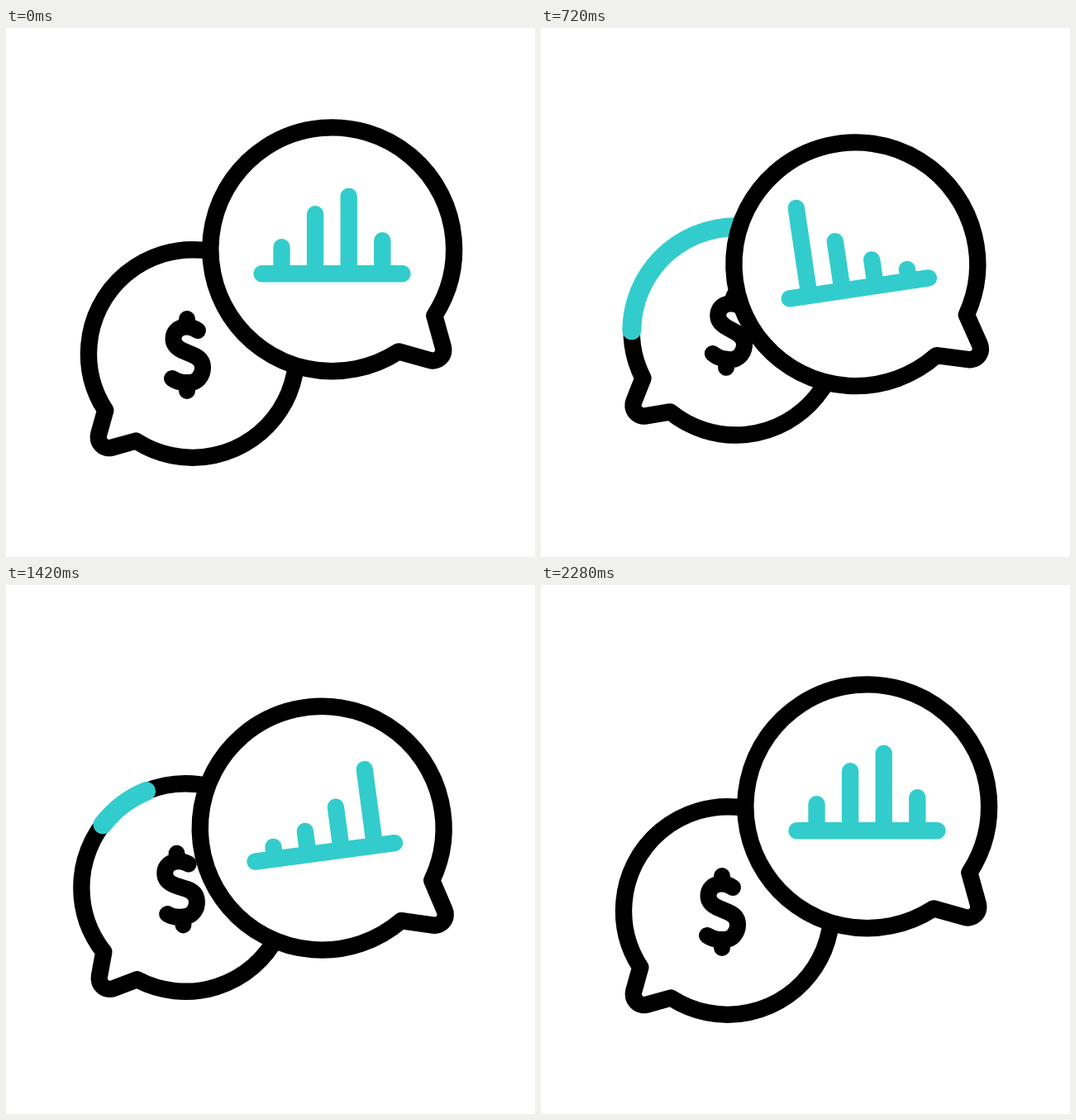
Write an HTML page with a canvas that moves like this. It is 640 px wide and 640 px high and loops after 2400 ms.

```html
<!DOCTYPE html>
<html lang="en">
<head>
<meta charset="utf-8">
<title>Chat bubbles</title>
<style>
  html, body { margin: 0; height: 100%; overflow: hidden; background: #fff; }
  canvas { display: block; width: 640px; height: 640px; }
</style>
</head>
<body>
<canvas id="stage" width="640" height="640"></canvas>
<script>
const ctx = document.getElementById('stage').getContext('2d');
const TEAL = '#33cccc', LOOP = 2400, REST = 2280, RAD = Math.PI / 180;

const sine = u => (1 - Math.cos(Math.PI * u)) / 2;
const quad = u => u < .5 ? 2 * u * u : 1 - 2 * (1 - u) ** 2;

// Eased position k along evenly spaced values, held at both ends
function glide(values, k, ease = sine) {
  const last = values.length - 1;
  k = Math.min(Math.max(k, 0), last);
  const i = Math.min(Math.floor(k), last - 1);
  return values[i] + (values[i + 1] - values[i]) * ease(k - i);
}

// Swings from rest through alternating peaks and back to rest
const swing = (first, step, ...peaks) => t =>
  glide([0, ...peaks, 0], t < first ? t / first : 1 + (t - first) / step);

const big = {
  x: 394.7, y: 267.8, r: 147.4, side: 1, pivotX: -83, pivotY: 101,
  tilt: swing(612, 417, -13, 16, -7.8, 4),
  lift: swing(572, 348, 58.6, -47.3, 53, -13.3)
};
const small = {
  x: 225.8, y: 394, r: 125.8, side: -1, pivotX: 24, pivotY: 94,
  tilt: swing(400, 455, -19, 12.4, -6.7, 4),
  lift: swing(355, 355, 31.5, -27.5, 63.5, -28, 21)
};

const dollar = new Path2D(`M232 366Q226 361.5 219 361.5C207 361.5 202.5 369 202.5 376
  S207 387 213 390L227 396C234 399 238 404 238 411C238 421 231 429 222 429
  H217Q208 429 201 424M219 352V361M219 429V439`);

// Speech bubble outline; starts near the top and may go round several times
function outline({ r, side }, turns) {
  const path = new Path2D(), start = 265 * RAD, a = 33 * RAD, b = 57 * RAD;
  const tip = r * .952;
  for (let i = 0; i < turns; i++) {
    path.arc(0, 0, r, start, a);
    path.arcTo(tip, tip, r * Math.cos(b), r * Math.sin(b), 13);
    path.arc(0, 0, r, b, start);
  }
  if (turns === 1) path.closePath();
  const placed = new Path2D();
  placed.addPath(path, new DOMMatrix([side, 0, 0, 1, 0, 0]));
  return placed;
}
big.path = outline(big, 1);
small.path = outline(small, 1);
const trail = outline(small, 2);

function stroke(path, color, width) {
  ctx.strokeStyle = color;
  ctx.lineWidth = width;
  ctx.stroke(path);
}

function drawBubble({ x, y, pivotX, pivotY, tilt, lift, path }, t, drawContent) {
  const angle = tilt(t) * RAD;
  ctx.save();
  ctx.translate(x + pivotX * (Math.cos(angle) - 1) + pivotY * Math.sin(angle), y + lift(t));
  ctx.rotate(angle);
  ctx.fillStyle = '#fff';
  ctx.fill(path);
  stroke(path, '#000', 20.4);
  drawContent(t);
  ctx.restore();
}

function drawDollar(t) {
  const sweep = start => glide([0, 940], (t - start) / 692);
  const head = sweep(497), tail = sweep(847);
  if (head - tail > .5) {
    ctx.setLineDash([head - tail, 4000]);
    ctx.lineDashOffset = -tail;
    stroke(trail, TEAL, 23);
    ctx.setLineDash([]);
  }
  ctx.translate(-small.x, -small.y);
  stroke(dollar, '#000', 20);
}

// Bars fall into a descending ramp, then an ascending one, then return
function drawChart(t) {
  const base = 297.2, chart = new Path2D(`M309.5 ${base}H479.5`);
  const ramp = (top, k) => top * .61 ** k - 13.5;
  [32, 72, 93.5, 40].forEach((rest, i) => {
    const x = 333.5 + 40.6 * i;
    const levels = [rest, ramp(121, i), ramp(109.5, 3 - i), rest];
    chart.moveTo(x, base);
    chart.lineTo(x, base - glide(levels, 3 * t / REST, quad));
  });
  ctx.translate(-big.x, -big.y);
  stroke(chart, TEAL, 20.4);
}

function frame() {
  const t = Math.floor(performance.now() % LOOP / 20) * 20;
  ctx.fillStyle = '#fff';
  ctx.fillRect(0, 0, 640, 640);
  ctx.lineCap = ctx.lineJoin = 'round';
  drawBubble(small, t, drawDollar);
  drawBubble(big, t, drawChart);
  requestAnimationFrame(frame);
}
frame();
</script>
</body>
</html>
```
